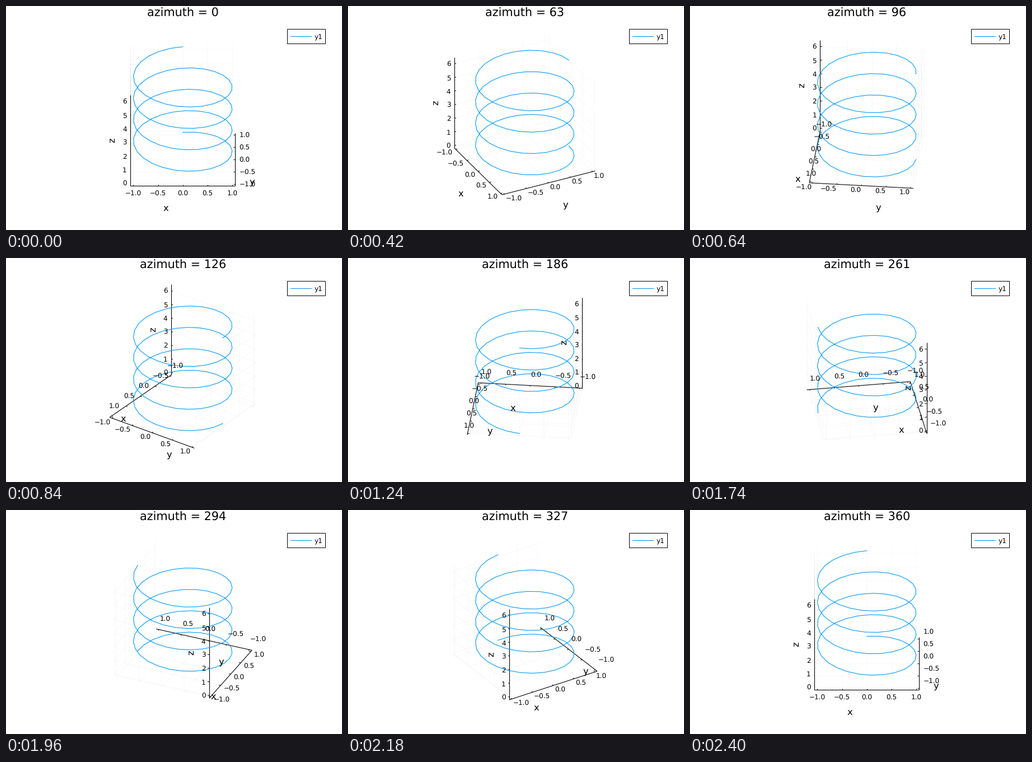
A matplotlib script that plays this animation: 600 px wide and 400 px high, repeating every 2.42 s.

```python
import numpy as np
import matplotlib.pyplot as plt
from matplotlib.animation import FuncAnimation
from matplotlib.collections import LineCollection
from matplotlib.patches import Rectangle

plt.rcParams["font.family"] = "DejaVu Sans"
plt.rcParams["text.hinting"] = "none"

W, H, DPI = 600, 400, 100
PX = 72 / DPI                     # one pixel in points
FRAMES, STEP, INTERVAL = 121, 3, 20
CX, CY, SIDE = 315.7, 193.2, 187.0
SIN_EL, COS_EL = 0.5, np.sqrt(0.75)
BLUE = "#009AFA"
TICK_PX, LABEL_PX, TITLE_PX = 12, 16.4, 20.8
TICK_GAP, LINE_H, MARK = 7.2, 12.8, 0.018
TICK_DROP, TITLE_DROP = 4.8, 45.1  # from anchor down to the text baseline
LO, HI = -0.5, 0.5

# Box coordinates run from -0.5 to 0.5 with a 3 % margin round the data.
PAD = 1.06
XY_TICKS = np.linspace(-1, 1, 5)
XY_POS = XY_TICKS / (2 * PAD)
Z_TICKS = np.arange(7)


def z_pos(z):
    return (z / (2 * np.pi) - 0.5) / PAD


t = np.linspace(0, 2 * np.pi, 100)
HELIX = np.array([np.sin(4 * t) / (2 * PAD), np.cos(4 * t) / (2 * PAD), z_pos(t)])

fig = plt.figure(figsize=(W / DPI, H / DPI), dpi=DPI, facecolor="white")
ax = fig.add_axes([0, 0, 1, 1])
ax.set_xlim(0, W)
ax.set_ylim(H, 0)
ax.axis("off")


def label(text, size, ha="center", x=0, y=0, **kw):
    return ax.text(x, y, text, fontsize=size * PX, ha=ha, va="baseline",
                   color="black", zorder=5, **kw)


def segments(width, zorder, **kw):
    group = LineCollection([], linewidths=width * PX, colors="black",
                           zorder=zorder, **kw)
    ax.add_collection(group, autolim=False)
    return group


def tick_name(v):
    return f"{v:.1f}".replace("-", "\u2212")


grid = segments(0.8, 1, alpha=0.03)
axes_lines = segments(1.1, 2)
marks = segments(1.0, 2)
curve, = ax.plot([], [], color=BLUE, lw=1.1 * PX, zorder=3)

title = label("", TITLE_PX, x=CX, y=18.6)
x_names = [label(tick_name(v), TICK_PX) for v in XY_TICKS]
y_names = [label(tick_name(v), TICK_PX) for v in XY_TICKS]
z_names = [label(str(v), TICK_PX, "right") for v in Z_TICKS]
x_title = label("x", LABEL_PX)
y_title = label("y", LABEL_PX)
z_title = label("z", LABEL_PX, rotation=90, rotation_mode="anchor")

ax.add_patch(Rectangle((502.2, 41.2), 68, 26, fc="white", ec="black",
                       lw=PX, zorder=4))
ax.plot([508, 545.2], [54.2, 54.2], color=BLUE, lw=1.1 * PX, zorder=5)
label("y1", TICK_PX, "left", x=550.2, y=59)


def make_camera(azimuth):
    a = np.radians(azimuth)
    c, s = np.cos(a), np.sin(a)

    def project(u, v, w):
        x = CX + SIDE * (u * c + v * s)
        y = CY - SIDE * (SIN_EL * (v * c - u * s) + COS_EL * w)
        return np.array([x, y])

    return project, (c, -SIN_EL * s), (s, SIN_EL * c)


def place_names(names, points, direction):
    """Set tick names beside a floor axis, at right angles to it on screen."""
    dx, dy = direction
    angle = np.degrees(np.arctan2(dy, dx)) % 360
    normal = np.radians(angle - 90)
    off = np.array([np.cos(normal), -np.sin(normal)]) * TICK_GAP
    if min(angle, 360 - angle) < 1e-6:
        ha, rise = "center", -LINE_H / 2
    elif angle <= 90:
        ha, rise = "left", 0
    elif angle < 270:
        ha, rise = "left", LINE_H
    else:
        ha, rise = "right", 0
    for name, point in zip(names, points):
        x, y = point + off
        name.set_ha(ha)
        name.set_position((x, y - rise + TICK_DROP))


def update(i):
    azimuth = STEP * i
    title.set_text(f"azimuth = {azimuth}")
    project, x_dir, y_dir = make_camera(azimuth)

    def path(*points):
        return np.array([project(*p) for p in points])

    curve.set_data(*project(*HELIX))

    left, corner, far = path((LO, LO, LO), (HI, LO, LO), (HI, HI, LO))
    top = project(LO, LO, HI)
    axes_lines.set_segments([np.array([left, corner]), np.array([corner, far]),
                             np.array([left, top])])

    zs = z_pos(Z_TICKS)
    grid.set_segments(
        [path((p, LO, LO), (p, HI, LO), (p, HI, HI)) for p in XY_POS]
        + [path((HI, p, LO), (LO, p, LO), (LO, p, HI)) for p in XY_POS]
        + [path((LO, LO, p), (LO, HI, p), (HI, HI, p)) for p in zs])
    marks.set_segments(
        [path((p, LO, LO), (p, LO + MARK, LO)) for p in XY_POS]
        + [path((HI, p, LO), (HI - MARK, p, LO)) for p in XY_POS]
        + [path((LO, LO, p), (LO, LO + MARK, p)) for p in zs])

    place_names(x_names, [project(p, LO, LO) for p in XY_POS], x_dir)
    place_names(y_names, [project(HI, p, LO) for p in XY_POS], y_dir)
    for name, p in zip(z_names, zs):
        x, y = project(LO, LO, p)
        name.set_position((x - 6.6, y + TICK_DROP))

    x_title.set_position((left + corner) / 2 + (-30.6, TITLE_DROP))
    y_title.set_position((corner + far) / 2 + (30.6, TITLE_DROP))
    z_title.set_position((left + top) / 2 + (-28.2, -0.4))
    return []


anim = FuncAnimation(fig, update, frames=FRAMES, interval=INTERVAL,
                     init_func=lambda: update(0), repeat=True,
                     repeat_delay=0, blit=False)
plt.show()
```
